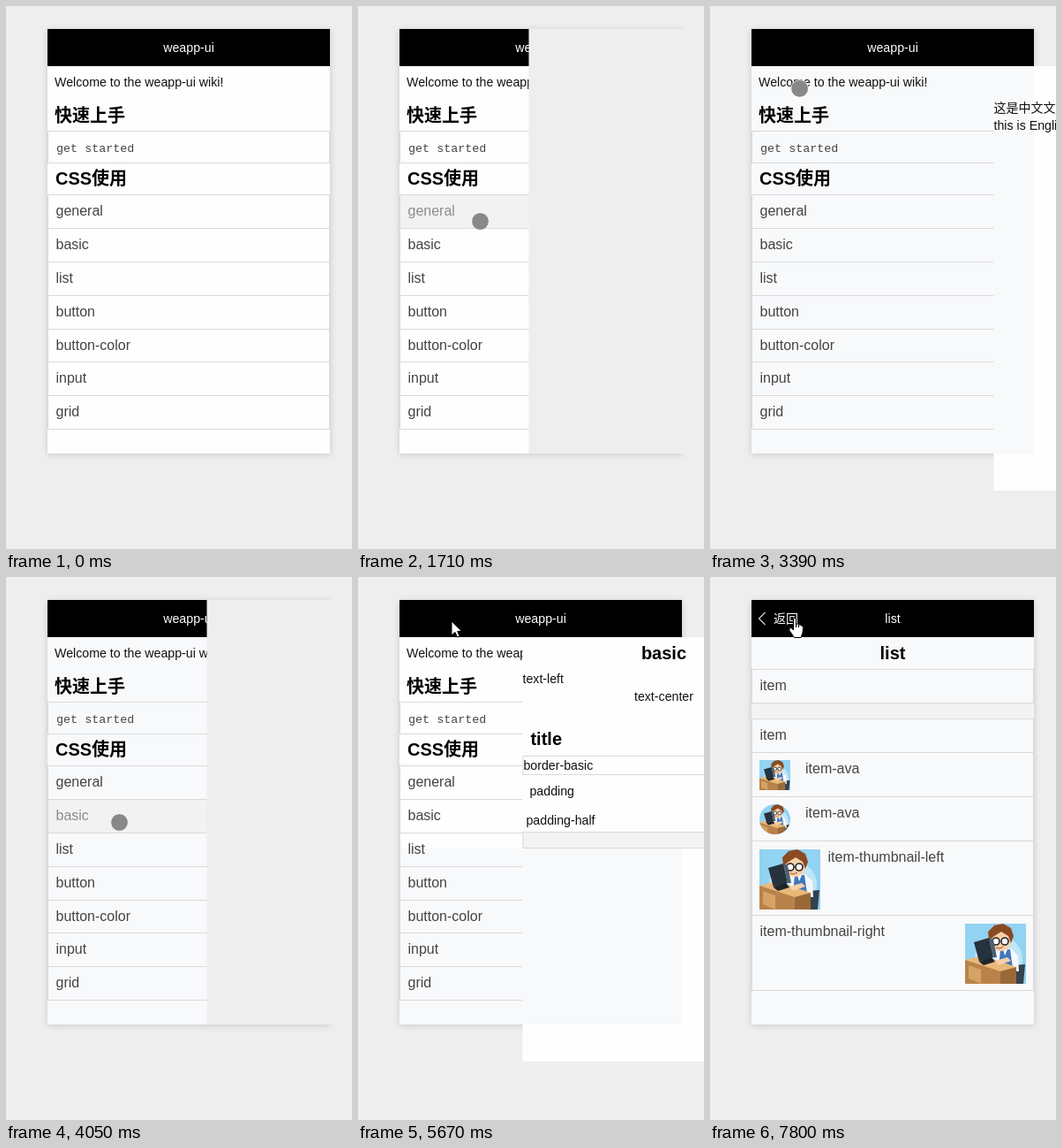
An HTML page with a canvas for the animation above (8 s loop, 392 by 614 pixels).

```html
<!DOCTYPE html>
<html lang="zh">
<head>
<meta charset="utf-8">
<title>weapp-ui</title>
<style>
html, body { margin: 0; width: 100%; height: 100%; overflow: hidden; background: #eee; }
canvas { display: block; width: 392px; height: 614px; }
</style>
</head>
<body>
<canvas id="stage" width="392" height="614"></canvas>
<script>
const ctx = document.getElementById('stage').getContext('2d');
const LOOP = 8000, SLIDE = 400, BACK_DELAY = 16;
const LEFT = 47, TOP = 26, WIDTH = 320, HEIGHT = 480, BODY = 68;
const RIGHT = LEFT + WIDTH, BOTTOM = TOP + HEIGHT, MID = LEFT + WIDTH / 2;
const SANS = '"Liberation Sans", Arial, "Noto Sans CJK SC", "Noto Sans CJK JP", "Noto Sans CJK", sans-serif';
const SMALL = '14.2px ' + SANS, ROW = '16px ' + SANS, HEAD = 'bold 20px ' + SANS;
const MONO = '13.4px "Liberation Mono", monospace';
const LINE = '#d9d9d9', INK = '#111', SOFT = '#444', GREY = '#eee';
const ITEMS = ['general', 'basic', 'list', 'button', 'button-color', 'input', 'grid'];

const trips = [
  { row: 0, tap: 1560, slide: 1585, back: 3150 },
  { row: 1, tap: 3945, slide: 3946, back: 5550 },
  { row: 2, tap: 6420, slide: 6458, back: Infinity }
];

// time, x, y of the pointer
const path = [
  [330, 368, 55], [600, 300, 112], [1050, 193, 186], [1170, 192, 184], [1350, 138, 243],
  [1760, 138, 243], [2370, 112, 128], [2600, 92, 60], [2820, 89, 52],
  [3270, 89, 52], [3560, 118, 150], [3930, 128, 277],
  [4140, 128, 277], [4760, 104, 44], [4860, 105, 40], [5100, 106, 50],
  [5700, 106, 50], [5960, 152, 235], [6080, 148, 268], [6240, 114, 311],
  [6640, 114, 311], [7230, 104, 96], [7620, 96, 47], [7800, 95, 46]
];

// cubic-bezier(.25, .1, .25, 1)
function ease(p) {
  if (p <= 0 || p >= 1) return p <= 0 ? 0 : 1;
  const curve = (a, b, s) => 3 * a * s * (1 - s) ** 2 + 3 * b * s * s * (1 - s) + s ** 3;
  let lo = 0, hi = 1;
  for (let i = 0; i < 24; i++) {
    const s = (lo + hi) / 2;
    if (curve(.25, .25, s) < p) lo = s; else hi = s;
  }
  return curve(.1, 1, lo);
}

function rect(x, y, w, h, color) {
  ctx.fillStyle = color;
  ctx.fillRect(x, y, w, h);
}

function text(str, x, y, font, color = INK, align = 'left') {
  ctx.font = font;
  ctx.fillStyle = color;
  ctx.textAlign = align;
  ctx.fillText(str, x, y);
}

function poly(points, fill, stroke, width = 1) {
  ctx.beginPath();
  for (let i = 0; i < points.length; i += 2) ctx.lineTo(points[i], points[i + 1]);
  if (fill) { ctx.closePath(); ctx.fillStyle = fill; ctx.fill(); }
  if (stroke) { ctx.strokeStyle = stroke; ctx.lineWidth = width; ctx.stroke(); }
}

function oval(x, y, rx, ry, fill, stroke, width = 1) {
  ctx.beginPath();
  ctx.ellipse(x, y, rx, ry, 0, 0, Math.PI * 2);
  if (fill) { ctx.fillStyle = fill; ctx.fill(); }
  if (stroke) { ctx.strokeStyle = stroke; ctx.lineWidth = width; ctx.stroke(); }
}

const hline = y => rect(LEFT, y, WIDTH, 1, LINE);

function frame(y, bottom) {
  hline(y);
  hline(bottom);
  rect(LEFT, y, 1, bottom - y, LINE);
  rect(RIGHT - 1, y, 1, bottom - y, LINE);
}

function tintTop(t) {
  if (t < 2060) return BOTTOM;
  if (t < 4440) return BODY;
  return t < 6940 ? 307 : BODY;
}

function paper(x, w, h, t) {
  rect(x, BODY, w, h, '#fefefe');
  const top = tintTop(t), end = Math.min(RIGHT, x + w);
  if (end > x) rect(x, top, end - x, BOTTOM - top, '#f8f9fb');
}

function header(title, back) {
  rect(LEFT, TOP, WIDTH, BODY - TOP, '#000');
  text(title, MID, 52, SMALL, '#fff', 'center');
  if (!back) return;
  poly([62.5, 40, 55.5, 47, 62.5, 54], null, '#ddd', 1.1);
  text('返回', 72, 52, '14px ' + SANS, '#fff');
}

function home(t, active) {
  header('weapp-ui', false);
  paper(LEFT, WIDTH, BOTTOM - BODY, t);
  text('Welcome to the weapp-ui wiki!', 55, 91, SMALL);
  text('快速上手', 55, 131, HEAD, '#000');
  frame(141, 177);
  text('get started', 57, 165, MONO, SOFT);
  text('CSS使用', 56, 202, HEAD, '#000');
  const rowY = i => Math.round(213.2 + 37.857 * i);
  if (active >= 0) rect(LEFT, rowY(active), WIDTH, 38, '#f2f2f2');
  ITEMS.forEach((name, i) => {
    frame(rowY(i), rowY(i + 1));
    text(name, 56.5, rowY(i) + 24, ROW, i === active ? '#8c8c8c' : SOFT);
  });
}

// A boy at a desk, on a 69 x 68 tile.
function picture(x, y, w, h, round) {
  ctx.save();
  ctx.translate(x, y);
  ctx.scale(w / 69, h / 68);
  ctx.beginPath();
  if (round) ctx.ellipse(34.5, 34, 34.5, 34, 0, 0, Math.PI * 2);
  else ctx.rect(0, 0, 69, 68);
  ctx.clip();
  rect(0, 0, 69, 68, '#92d2f2');
  oval(38, 40, 27, 27, '#bfe6f7');
  poly([54, 47, 68, 46, 66, 68, 48, 68], '#34424f');
  poly([33, 29, 52, 28, 60, 36, 61, 54, 36, 52], '#f4f7fb');
  poly([40, 29, 51, 29, 54, 50, 38, 50], '#3f78c0');
  poly([43, 29, 48, 29, 45, 36], '#fff');
  oval(40, 20, 12, 11, '#f7cfa8');
  poly([27, 19, 26, 9, 33, 2, 43, 0, 52, 5, 55, 14, 52, 22, 49, 14, 41, 9, 33, 14], '#8a4a22');
  oval(35, 20, 4, 4, '#fff', '#222', 1.6);
  oval(45, 20, 4, 4, '#fff', '#222', 1.6);
  poly([35, 27, 39, 28, 43, 26], null, '#a0522d');
  poly([0, 41, 20, 36, 58, 49, 40, 56], '#e8b878');
  poly([0, 41, 40, 54, 40, 68, 0, 68], '#b9824a');
  poly([40, 54, 58, 49, 58, 68, 40, 68], '#9b6938');
  poly([4, 47, 18, 52, 18, 68, 4, 62], '#d5a364');
  poly([10, 21, 27, 16, 32, 38, 16, 43], '#26323d');
  poly([27, 16, 32, 18, 36, 38, 32, 38], '#4d6070');
  poly([16, 43, 30, 38, 34, 43, 21, 47], '#1c242b');
  poly([34, 42, 48, 38, 52, 42, 38, 47], '#f7cfa8');
  ctx.restore();
}

const pages = [
  () => {
    text('这是中文文字', LEFT, 120, '14px ' + SANS);
    text('this is English', LEFT, 140, SMALL);
  },
  () => {
    text('text-left', LEFT, 120, SMALL);
    text('text-center', MID, 140, SMALL, INK, 'center');
    text('text-right', RIGHT, 160, SMALL, INK, 'right');
    text('title', 56, 190, HEAD, '#000');
    frame(202, 223);
    text('border-basic', 48, 218, SMALL);
    text('padding', 55, 247, SMALL);
    text('padding-half', 51, 280, SMALL);
    rect(LEFT, 288, WIDTH, 19, '#f3f3f3');
    frame(288, 306);
  },
  () => {
    rect(LEFT, 142, WIDTH, 18, '#f3f3f3');
    frame(104, 142);
    frame(160, 467);
    [198, 248, 298, 382].forEach(hline);
    text('item', 56.5, 128, ROW, SOFT);
    text('item', 56.5, 184, ROW, SOFT);
    text('item-ava', 108, 222, ROW, SOFT);
    text('item-ava', 108, 272, ROW, SOFT);
    text('item-thumbnail-left', 133.5, 322, ROW, SOFT);
    text('item-thumbnail-right', 56.5, 406, ROW, SOFT);
    picture(56, 207, 35, 34);
    picture(56, 257, 35, 34, true);
    picture(56, 308, 69, 68);
    picture(289, 392, 69, 68);
  }
];

function content(row) {
  text(ITEMS[row], MID, 93, HEAD, '#000', 'center');
  pages[row]();
}

function arrow(x, y) {
  ctx.save();
  ctx.translate(x, y);
  poly([0, 0, 0, 16, 4, 12.5, 6.5, 18, 9, 17, 6.7, 11.5, 11.5, 11.5, 0, 0], '#fff', '#000', 1);
  ctx.restore();
}

function hand(x, y) {
  ctx.save();
  ctx.translate(x - 6, y - 1);
  ctx.beginPath();
  ctx.moveTo(5.5, 15);
  ctx.lineTo(5.5, 2.5);
  ctx.quadraticCurveTo(7, -.5, 8.5, 2.5);
  ctx.lineTo(8.5, 8.5);
  ctx.quadraticCurveTo(10.5, 7, 11.5, 9);
  ctx.quadraticCurveTo(13.5, 8, 14.2, 10);
  ctx.quadraticCurveTo(16.5, 9.5, 16.5, 12);
  ctx.lineTo(16, 18);
  ctx.lineTo(14, 23.5);
  ctx.lineTo(6.5, 23.5);
  ctx.lineTo(1, 15.5);
  ctx.quadraticCurveTo(0, 12, 3, 12.5);
  ctx.closePath();
  ctx.fillStyle = '#fff';
  ctx.fill();
  ctx.strokeStyle = '#000';
  ctx.lineWidth = 1;
  ctx.stroke();
  poly([8.5, 8, 8.5, 12], null, '#000');
  poly([11.5, 9, 11.5, 12], null, '#000');
  ctx.restore();
}

function pointer(t, canGoBack) {
  if (t < path[0][0]) return;
  let i = 0;
  while (i < path.length - 1 && path[i + 1][0] <= t) i++;
  const a = path[i], b = path[i + 1] || a;
  const p = a === b ? 0 : (t - a[0]) / (b[0] - a[0]);
  const x = a[1] + (b[1] - a[1]) * p, y = a[2] + (b[2] - a[2]) * p;
  if (y >= BODY && x < RIGHT) oval(x + .5, y + .5, 9.8, 9.8, '#888', 'rgba(255,255,255,.7)', 1);
  else if (canGoBack && x < 108) hand(x, y);
  else arrow(x, y);
}

function draw(t) {
  rect(0, 0, 392, 614, GREY);
  ctx.save();
  ctx.shadowColor = 'rgba(0,0,0,.16)';
  ctx.shadowBlur = 7;
  ctx.shadowOffsetY = 1;
  rect(LEFT, TOP, WIDTH, HEIGHT, GREY);
  ctx.restore();

  const trip = trips.find(k => t >= k.tap && t < k.back + BACK_DELAY + SLIDE);
  let canGoBack = false;
  if (!trip) {
    home(t, -1);
  } else if (t < trip.slide + SLIDE) {
    home(t, trip.row);
    const x = RIGHT - WIDTH * ease((t - trip.slide) / SLIDE);
    rect(x, TOP, WIDTH, HEIGHT, GREY);
  } else if (t >= trip.back) {
    home(t, -1);
    const dx = WIDTH * ease((t - trip.back - BACK_DELAY) / SLIDE);
    paper(LEFT + dx, WIDTH, HEIGHT, t);
    ctx.save();
    ctx.translate(dx, 0);
    content(trip.row);
    ctx.restore();
  } else if (t >= trip.slide + 480) {
    canGoBack = true;
    header(ITEMS[trip.row], true);
    paper(LEFT, WIDTH, BOTTOM - BODY, t);
    if (t >= trip.tap + 830) content(trip.row);
  }
  pointer(t, canGoBack);
}

function tick() {
  draw(performance.now() % LOOP);
  requestAnimationFrame(tick);
}
tick();
</script>
</body>
</html>
```
